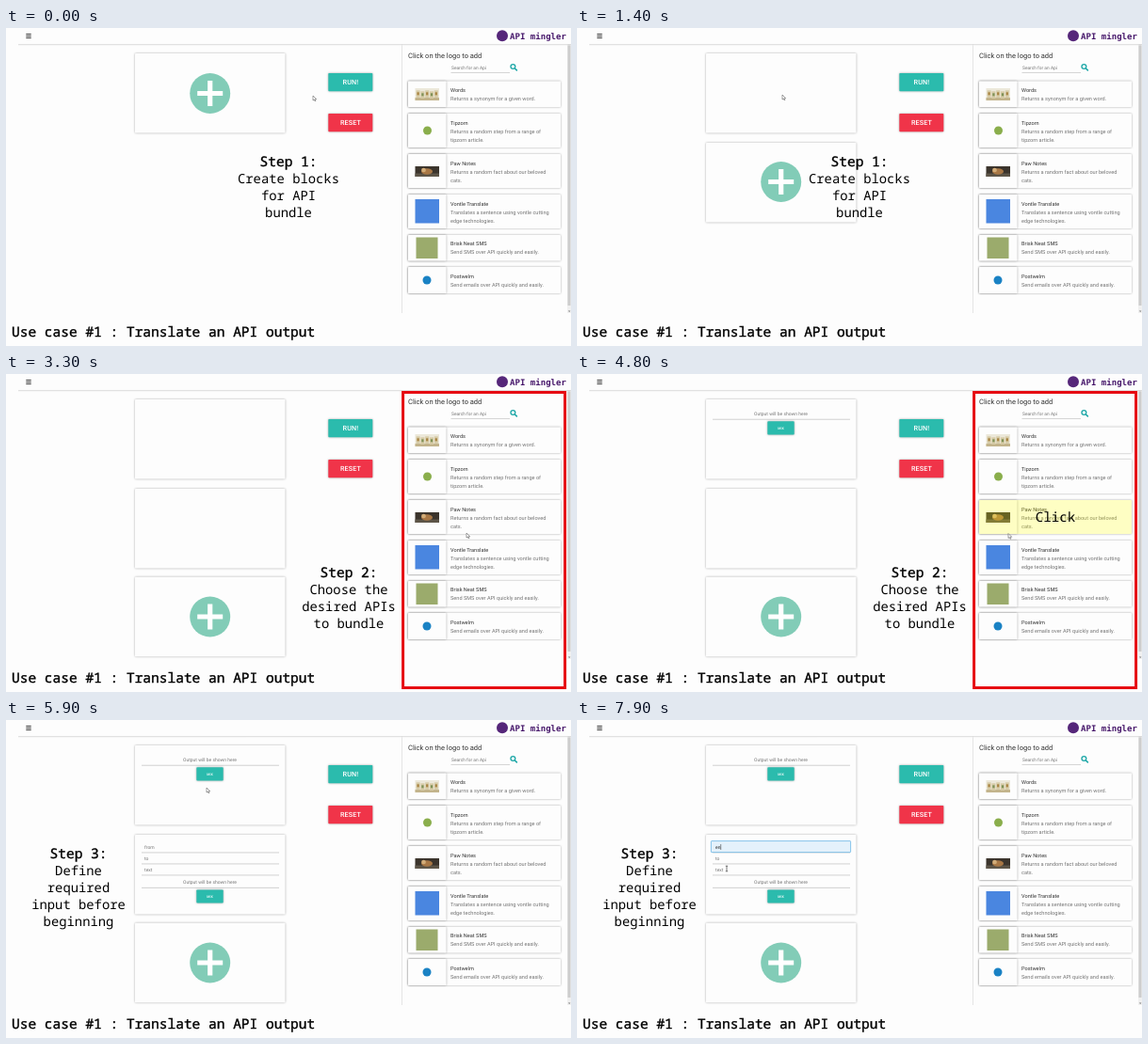
Animation of 600 by 338 pixels, one loop 8000 ms. Source, as an HTML page:

```html
<!DOCTYPE html>
<html lang="en">
<head>
<meta charset="utf-8">
<title>API mingler</title>
<style>
html, body { margin: 0; width: 100%; height: 100%; overflow: hidden; background: #fdfdfd; }
svg { display: block; width: 600px; height: 338px; text-rendering: geometricPrecision; }
text { font-family: Roboto, sans-serif; fill: #757575; }
.card { filter: drop-shadow(0 .9px .8px rgba(0,0,0,.34)); }
.big { font-family: "Noto Sans Mono", "DejaVu Sans Mono", monospace; fill: #000; }
.heavy { stroke: #000; stroke-width: .4px; }
.mid { text-anchor: middle; }
.btn { fill: #fff; text-anchor: middle; font-weight: 500; }
</style>
</head>
<body>
<svg id="stage" viewBox="0 0 600 338"></svg>
<script>
const NS = 'http://www.w3.org/2000/svg';
const stage = document.getElementById('stage');
const LOOP = 8000, STEP = 100;
const PAPER = '#fdfdfd', TEAL = '#2bbbad';

function add(tag, attrs, parent = stage) {
  const el = document.createElementNS(NS, tag);
  for (const k in attrs) el.setAttribute(k, attrs[k]);
  parent.appendChild(el);
  return el;
}
const rect = (x, y, width, height, fill, parent, more) =>
  add('rect', { x, y, width, height, fill, ...more }, parent);
const card = (x, y, w, h, parent, fill = PAPER) =>
  rect(x, y, w, h, fill, parent, { class: 'card', rx: .8 });
const line = (x1, x2, y, color, parent) => rect(x1, y, x2 - x1, .7, color, parent);
const dot = (cx, cy, r, fill, parent) => add('circle', { cx, cy, r, fill }, parent);
function text(x, y, size, str, parent, more) {
  const el = add('text', { x, y, 'font-size': size, ...more }, parent);
  el.textContent = str;
  return el;
}

// Parts visible only during a [from, to) span
const timed = [];
function during(span, parent = stage) {
  const el = add('g', {}, parent);
  timed.push({ el, span });
  return el;
}

// Side panel
rect(420, 17, .8, 286, '#dedede');
rect(596, 17, 4, 286, '#f0f0f0');
rect(596.5, 17, 3, 278, '#cdcdcd');
add('path', { d: 'M597 300.5h2.4l-1.2 1.5z', fill: '#777' });
text(427, 32, 7.5, 'Click on the logo to add', stage, { style: 'fill:#333' });
text(473, 43.6, 4.85, 'Search for an Api');
line(472.5, 535, 47, '#c4c4c4');
add('circle', { cx: 538.4, cy: 41, r: 2.4, fill: 'none', stroke: '#1aa6a6', 'stroke-width': 1.3 });
add('path', { d: 'M540.2 42.8l2.6 2.6', stroke: '#1aa6a6', 'stroke-width': 1.5 });

const rows = [
  [56.5, 27.5, 'Words', 'Returns a synonym for a given word.'],
  [91, 36, 'Tipzorn', 'Returns a random step from a range of', 'tipzorn article.'],
  [134, 36, 'Paw Notes', 'Returns a random fact about our beloved', 'cats.'],
  [177, 36, 'Vontle Translate', 'Translates a sentence using vontle cutting', 'edge technologies.'],
  [220, 27.5, 'Brisk Neat SMS', 'Send SMS over API quickly and easily.'],
  [254, 28, 'Postwelm', 'Send emails over API quickly and easily.']
];
for (const [y, h, title, ...desc] of rows) {
  card(427, y, 162, h);
  card(427, y, 40.5, h);
  const base = y + h / 2 - (desc.length > 1 ? 6 : 2.3);
  text(472, base, 5.6, title, stage, { style: 'fill:#333' });
  desc.forEach((d, i) => text(472, base + 8.8 * (i + 1), 5.6, d));
}

// Thumbnails
rect(434.5, 64, 25.5, 13, '#ece8da');
rect(434.5, 74, 25.5, 3, '#c3b48c');
for (let i = 0; i < 5; i++) {
  const x = 435.6 + i * 4.8, y = 66.3 + i % 2;
  rect(x, y, 4, 7.5, '#d6cba6');
  rect(x + .9, y + 2, 2.2, 3, i % 2 ? '#7d9157' : '#a98443');
}
dot(447.5, 109, 4.5, '#8aae4c');
rect(434.5, 147, 25.5, 11, '#3b342c');
rect(434.5, 154.5, 25.5, 3.5, '#5d5548');
add('ellipse', { cx: 447, cy: 152.5, rx: 6, ry: 3.3, fill: '#a87745' });
add('ellipse', { cx: 443.5, cy: 151, rx: 2.4, ry: 2.3, fill: '#d2ac78' });
rect(434.5, 182, 25.5, 25.5, '#4a86e0');
rect(435.5, 222.5, 23, 22.5, '#9bab6c');
dot(447, 268, 4.5, '#1a82c4');

// Header
rect(0, 0, 600, 17, PAPER);
line(13, 600, 17, '#cfcfcf');
line(13, 600, 17.7, '#ececec');
for (let i = 0; i < 3; i++) rect(21.3, 6 + i * 2, 5.4, .9, '#222');
dot(527, 8.3, 6, '#56277a');
text(535, 11.7, 9.05, 'API mingler', stage, {
  style: 'font-family:"DejaVu Sans Mono",monospace;font-weight:700;fill:#47186b'
});

// Blocks
const blocks = [
  { y: 27, from: 0, hover: [300, 800] },
  { y: 122, from: 800, hover: [1800, 2200] },
  { y: 215.7, from: 2200 }
];
for (const { y, from, hover } of blocks) {
  const g = during([from, LOOP]);
  card(137, y, 159.5, 84.5, g);
  if (hover) rect(137, y, 159.5, 84.5, '#dffdfd', during(hover, g));
}
const plus = add('g', {});
const disc = dot(0, 0, 21.5, '#82ccb7', plus);
add('path', { d: 'M-13.5 0H13.5M0-13.5V13.5', stroke: '#fff', 'stroke-width': 5.2 }, plus);

function output(y, parent) {
  text(216.5, y, 4.98, 'Output will be shown here', parent, { class: 'mid' });
  line(144, 290, y + 4.1, '#bdbdbd', parent);
  card(202.3, y + 6.6, 28.4, 14.2, parent, TEAL);
  text(216.5, y + 15, 3.6, 'MIX', parent, { class: 'btn' });
}
output(43.7, during([4300, LOOP]));
const form = during([5400, LOOP]);
['from', 'to', 'text'].forEach((label, i) => {
  const g = i ? form : during([5400, 7300], form);
  text(147, 136.8 + i * 12, 5, label, g);
  line(144, 290, 140.6 + i * 12, '#bdbdbd', form);
});
output(173.8, form);

// Typing in the first field
const field = during([7300, LOOP]);
rect(142.4, 128.6, 148.2, 12, '#e4f1fb', field, { stroke: '#6bb6e6', 'stroke-width': .8, rx: .6 });
const typed = text(147, 136.8, 5, '', field, { style: 'fill:#222' });
const caret = rect(147, 132, .5, 6, '#222', field);

// Action buttons
[['RUN!', 48, TEAL], ['RESET', 91, '#f03449']].forEach(([label, y, color]) => {
  card(342.3, y, 47, 19.3, stage, color);
  text(366, y + 12.4, 7.2, label, stage, { class: 'btn', 'letter-spacing': .15 });
});

// Row highlights, frame and captions
const glow = { 'fill-opacity': .23 };
rect(427, 134, 162, 36, '#ff0', during([3700, 5000]), glow);
rect(427, 177, 162, 36, '#ff0', during([5000, 5500]), glow);

rect(421.6, 19.5, 172, 314, 'none', during([2800, 5600]), { stroke: '#e60b12', 'stroke-width': 3 });

function caption(x, y, span, title, ...lines) {
  const g = during(span);
  text(x, y, 14.5, title, g, { class: 'big mid heavy' });
  lines.forEach((s, i) => text(x, y + 18 * (i + 1), 13.85, s, g, { class: 'big mid' }));
}
caption(300, 147, [0, 2800], 'Step 1:', 'Create blocks', 'for API', 'bundle');
caption(364, 216, [2800, 5600], 'Step 2:', 'Choose the', 'desired APIs', 'to bundle');
caption(77, 147, [5600, LOOP], 'Step 3:', 'Define', 'required', 'input before', 'beginning');
text(508, 157, 14.2, 'Click', during([4100, 5000]), { class: 'big mid' });
text(508, 200, 14.2, 'Click', during([5200, 5500]), { class: 'big mid' });
text(6, 328.3, 14.53, 'Use case #1 : Translate an API output', stage, { class: 'big heavy' });

// Pointer
const pointer = add('g', {});
const arrow = add('path', {
  d: 'M0 0V5L1.2 4L2 5.8L2.9 5.4L2.1 3.7H3.7Z', fill: '#fff', stroke: '#555', 'stroke-width': .55
}, pointer);
const beam = add('path', {
  d: 'M-1.2-2.8H1.2M0-2.8V2.8M-1.2 2.8H1.2', fill: 'none', stroke: '#222', 'stroke-width': .6
}, pointer);

const path = [ // time, x, y
  [0, 326, 72], [600, 218, 71], [1400, 218, 71], [2000, 216, 163], [2200, 216, 163],
  [2500, 338, 180], [2700, 338, 180], [3300, 489, 169], [3500, 489, 169], [3900, 458, 163],
  [4600, 458, 169.5], [4900, 458, 169.5], [5200, 449, 195], [5400, 449, 195],
  [5800, 213, 72], [6300, 213, 72], [6900, 151, 135], [7600, 151, 135], [7900, 159, 158]
];
function pointAt(t) {
  let i = 0;
  while (i < path.length - 2 && t >= path[i + 1][0]) i++;
  const [t0, x0, y0] = path[i], [t1, x1, y1] = path[i + 1];
  const p = Math.min(1, (t - t0) / (t1 - t0));
  const e = p * p * (3 - 2 * p);
  return [x0 + (x1 - x0) * e, y0 + (y1 - y0) * e];
}
const setShown = (el, on) => el.setAttribute('display', on ? 'inline' : 'none');

function render(t) {
  const within = ([a, b]) => t >= a && t < b;
  for (const { el, span } of timed) setShown(el, within(span));

  const slot = t < 800 ? 69.5 : t < 2200 ? 163.5 : 258;
  plus.setAttribute('transform', `translate(216.7 ${slot})`);
  const hovered = blocks.some(b => b.hover && within(b.hover));
  disc.setAttribute('fill', hovered ? '#7ccab6' : '#82ccb7');

  const count = t < 7400 ? 0 : t < 7600 ? 1 : 2;
  typed.textContent = 'en'.slice(0, count);
  caret.setAttribute('x', 147.2 + count * 2.7);

  pointer.setAttribute('transform', `translate(${pointAt(t).join(' ')})`);
  setShown(arrow, t < 6900);
  setShown(beam, t >= 6900);
}

const start = performance.now();
function tick() {
  const t = (performance.now() - start) % LOOP;
  render(Math.floor(t / STEP) * STEP);
  requestAnimationFrame(tick);
}
tick();
</script>
</body>
</html>
```
